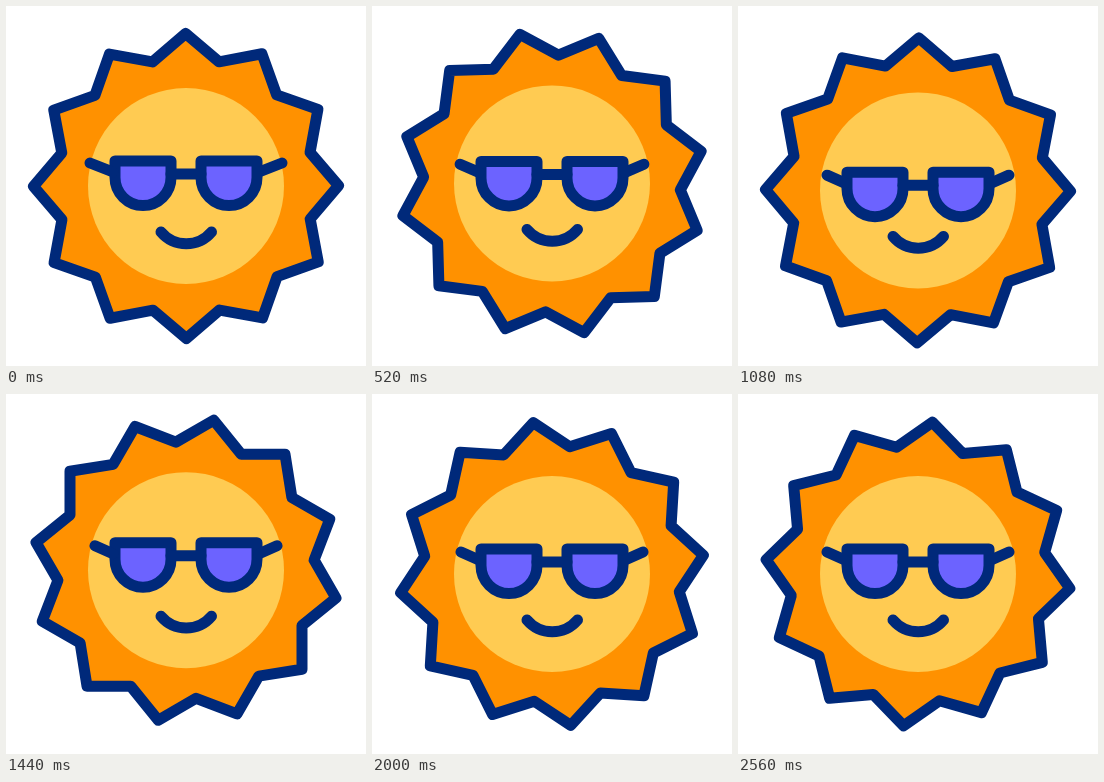
An HTML page for the animation above (2.6 s loop, 360 by 360 pixels).

```html
<!DOCTYPE html>
<html lang="en">
<head>
<meta charset="utf-8">
<title>Sun with sunglasses</title>
<style>
  html, body { margin: 0; width: 100%; height: 100%; overflow: hidden; background: #fff; }
  svg { display: block; width: 100vw; height: 100vh; }
</style>
</head>
<body>
<svg viewBox="0 0 360 360">
  <g id="sun" stroke="#00297a" stroke-width="11" stroke-linecap="round" stroke-linejoin="round" fill="none">
    <polygon id="rays" fill="#ff9100"/>
    <circle cx="180" cy="180" r="98" fill="#ffcb52" stroke="none"/>
    <path d="M155 226A33 33 0 0 0 205.500 226"/>
    <g id="glasses">
      <path fill="#6c63ff" d="M109 155H165V171.500A28 28 0 0 1 109 171.500Z"/>
      <path fill="#6c63ff" d="M195 155H251V171.500A28 28 0 0 1 195 171.500Z"/>
      <path d="M165 168H195"/>
      <path id="arms"/>
    </g>
  </g>
</svg>
<script>
const LOOP = 2600;
const [sun, rays, glasses, arms] = ['sun', 'rays', 'glasses', 'arms'].map(id => document.getElementById(id));

rays.setAttribute('points', Array.from({ length: 24 }, (_, i) => {
  const radius = i % 2 ? 128.5 : 152.5;
  const angle = i * Math.PI / 12;
  return [180 + radius * Math.sin(angle), 180 - radius * Math.cos(angle)].map(v => v.toFixed(2));
}).join(' '));

// Keys are [time, value] pairs, eased in and out between neighbours.
const sunDrop = [[0, 0], [333, 12.3], [633, -9.3], [1033, 5.1], [1333, -5], [1667, 0]];
const glassesDrop = [[0, 0], [367, 11.5], [700, -7.8], [1067, 6.8], [1367, -3], [1667, 0]];
const armInset = [[200, 0], [640, 5]];

function valueAt(keys, time) {
  if (time <= keys[0][0]) return keys[0][1];
  const next = keys.findIndex(key => key[0] > time);
  if (next < 0) return keys[keys.length - 1][1];
  const [t0, v0] = keys[next - 1], [t1, v1] = keys[next];
  const p = (time - t0) / (t1 - t0);
  return v0 + (v1 - v0) * p * p * (3 - 2 * p);
}

function draw(time) {
  const inset = valueAt(armInset, time);
  const y = 157 + inset / 5;
  sun.setAttribute('transform', `translate(0 ${valueAt(sunDrop, time)})`);
  glasses.setAttribute('transform', `translate(0 ${valueAt(glassesDrop, time)})`);
  rays.setAttribute('transform', `rotate(${-360 * time / LOOP} 180 180)`);
  arms.setAttribute('d', `M${84 + inset} ${y}L107 166M${276 - inset} ${y}L253 166`);
}

const start = performance.now();
function tick() {
  draw((performance.now() - start) % LOOP);
  requestAnimationFrame(tick);
}
draw(0);
requestAnimationFrame(tick);
</script>
</body>
</html>
```
